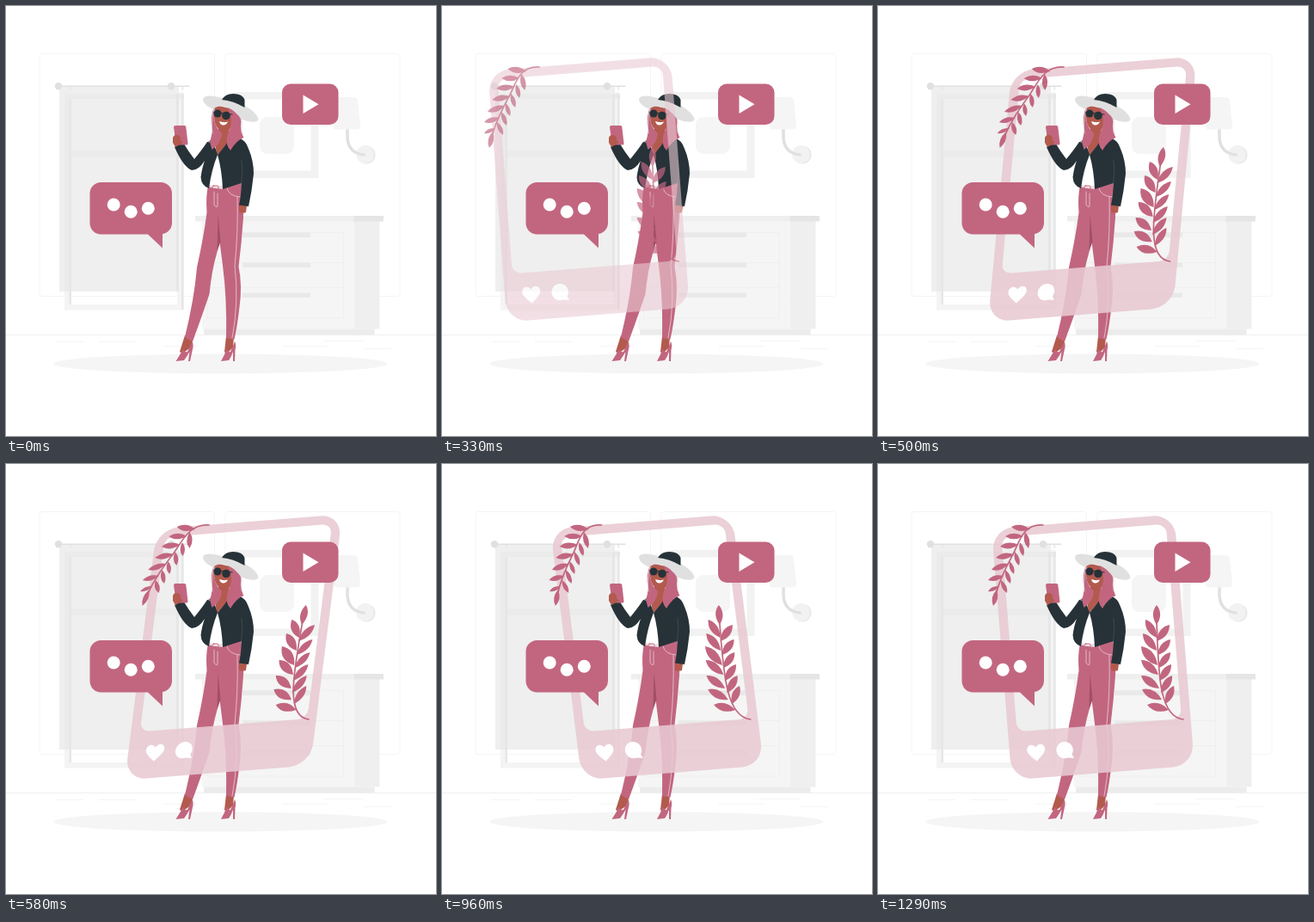
An HTML page that plays this animation: 500 px wide and 500 px high, repeating every 1330 ms.

```html
<!DOCTYPE html>
<html lang="en">
<head>
<meta charset="utf-8">
<title>Social media story</title>
<style>
  html, body { margin: 0; width: 100%; height: 100%; overflow: hidden; background: #fff; }
  svg { display: block; width: 100%; height: 100%; }
  .pink { fill: #c26680; }
  .dark { fill: #263238; }
  .skin { fill: #b35a4e; }
  .white { fill: #fff; }
  .line { fill: none; stroke-linecap: round; }
</style>
</head>
<body>
<svg viewBox="0 0 500 500">
  <g id="room">
    <g class="line" stroke="#f3f3f3" stroke-width=".8">
      <rect x="39" y="55.500" width="203.500" height="282" rx="3"/>
      <rect x="255" y="55.500" width="203" height="282" rx="3"/>
      <path stroke="#ebebeb" d="M0 382.500H500"/>
      <path d="M57 390.500h33M108 390.500h43M185 395.500h38M322 395.500h52M369 389.500h46M417 398.500h31"/>
    </g>

    <!-- window and blind -->
    <path fill="#f4f4f4" fill-rule="evenodd" d="M68 100H206.500V353.500H68ZM75 108V347H199V108Z"/>
    <path fill="#efefef" d="M62 94H201V332H62Z"/>
    <path fill="#ebebeb" d="M68 102H207V108H76V332H68ZM76 168H198V176H76Z"/>
    <path fill="#e6e6e6" d="M73.500 108h2.500v239h-2.500ZM198 102h3v230h-3ZM204 102h2.500v251h-2.500ZM74 94h1.500v4H74ZM204.500 94h1.500v4h-1.500Z"/>
    <path class="line" stroke="#e0e0e0" stroke-width="1.500" d="M59 93.300H213"/>
    <circle cx="61" cy="93.300" r="4.200" fill="#e0e0e0"/>
    <circle cx="192" cy="93.300" r="4.200" fill="#e0e0e0"/>

    <!-- picture -->
    <path fill="#f2f2f2" fill-rule="evenodd" d="M264 100H363.500V200H264ZM273 108.500V191.500H354.500V108.500Z"/>
    <rect x="295" y="129" width="40" height="43" rx="9" fill="#f5f5f5"/>

    <!-- lamp -->
    <circle cx="419" cy="173" r="10.500" fill="#e6e6e6"/>
    <circle cx="417.500" cy="172.500" r="10.500" fill="#f2f2f2"/>
    <path class="line" stroke="#e0e0e0" stroke-width="3.500" d="M397 143V153Q398 171 416 173"/>
    <path fill="#f5f5f5" d="M388 106H404Q408 106 409 110L412 139Q412 143.500 408 143.500H384Q380 143.500 381 139L384 110Q385 106 388 106Z"/>

    <!-- dresser -->
    <path fill="#f5f5f5" d="M228 250H404.500V375.500H228Z"/>
    <path fill="#efefef" d="M404.500 250H434.500V375.500H404.500ZM220 244H405V250.500H220Z"/>
    <path fill="#e5e5e5" d="M404.500 244H439V250.500H404.500Z"/>
    <path fill="#ececec" d="M230 375.500H428.500V382H230Z"/>
    <path class="line" stroke="#efefef" d="M235 263.500H392.500V363H235ZM235 298.500H392.500M235 327.500H392.500"/>
    <path fill="#e9e9e9" d="M275 263.500h79v5.500h-79ZM275 298.500h79v5.500h-79ZM275 333.500h79v5.500h-79Z"/>
    <ellipse cx="249.500" cy="416" rx="194" ry="11.500" fill="#f5f5f5"/>
  </g>

  <g id="woman">
    <path class="skin" d="M208 383L217.500 387 215 397 205 404 202 402ZM256 384H265L264 397 256 405 254 402Z"/>
    <path class="pink" d="M197.500 413Q202 406 206 399 207 403 211 402 214 396 216.500 390 218.500 394 217 399L214 413H212L213.500 402Q210 408 207 412ZM250 413Q254 406 256.500 399 258 403 261 402 264 396 266 390 268 394 266.500 400L266 413H264L264 402Q262 408 259 412Z"/>
    <path class="pink" d="M235.500 207L252 212 273 205Q277 225 276 246 274 275 270.500 303 275 325 271.500 350 269 372 265.500 387.500L256 386Q257 340 252 302L248.500 274 245.500 286Q239 308 236.500 335 226 366 217 390L208 385Q219 340 222 304 230 268 233.500 240 232 220 235.500 207Z"/>
    <path fill="#a24e68" d="M246.500 242L249.500 274 245.500 285Z"/>
    <g class="line" stroke="#e6c2cc" stroke-width=".9">
      <path d="M257 212Q259 221 272 222M269 222Q270 265 266 302 271 345 263 386"/>
      <path d="M242 216V231Q244 235 246 233V218"/>
    </g>
    <path class="white" d="M243 166L249 168 253 213 235 209Z"/>
    <path class="line" stroke="#f1dce2" stroke-width="2.800" stroke-linecap="butt" d="M236 209Q244 212 252 210.500"/>
    <rect x="240" y="209" width="7" height="4" rx="1.500" class="line" stroke="#c26680"/>

    <path class="skin" d="M271 230L280 232 279 240Q275 241 271 240Z"/>
    <path class="skin" d="M247 143H259L260 157 245 174 243 158Z"/>
    <path class="dark" d="M196 164L205.500 158Q212 169 219 178 228 167 234 158L245 153 243 164 246 173Q239 190 236 212 227 209 226.500 199 228 188 231 180 224 191 216 191 206 187 196 164Z"/>
    <path class="dark" d="M246 173Q255 163 261 153L270 153Q279 156 282 166 288 180 288 195 286 215 282 233L271 231.500Q274 217 273.500 206 264 209 252 213 251 190 246 173Z"/>
    <path class="line" stroke="#46535a" stroke-width=".7" d="M274 179Q276 193 273.500 206"/>
    <path class="line" stroke="#fff" stroke-width=".8" d="M230 159Q234 156 237 158"/>

    <path class="pink" d="M197 139H207.500Q209 139 209.300 140.500L211.500 160Q211.500 161.500 210 161.500H200Q198 161.500 197.700 160L195 141Q195 139 197 139Z"/>
    <path class="skin" d="M194 153Q196 149 200 150 204 152 203 156L206 159 197 164 194 159Z"/>

    <path class="skin" d="M243 115L264 120Q266 133 261 142 257 148 251 146 243 142 242 130Z"/>
    <path class="pink" d="M243 115Q236 131 240 144 239 152 237 158L239.500 167Q250 160 251 148 244 143 242 131ZM257 116L271 121Q275 130 273 140 274 149 276.500 153 268 156 261 168 254 161 258 148 264 136 261 127Z"/>
    <path class="line" stroke="#d9d9d9" stroke-width=".8" d="M242 120Q238 136 240 148M272 125Q275 136 274 147"/>
    <path class="white" d="M248 134Q253 136 258 134.500 256 139 252 138.500 249 138 248 134Z"/>
    <circle class="dark" cx="246" cy="125" r="4.600"/>
    <circle class="dark" cx="256" cy="127.500" r="4.800"/>
    <path class="line" stroke="#263238" d="M242 123.500L263 126"/>
    <path fill="#e0e0e0" d="M229 108C232 102 243 105 255 108C272 111 290 121 293.500 131C293 137 281 135 273 131C263 116 247 113 241 120C234 117 229 113 229 108Z"/>
    <path class="dark" d="M251 109Q255 102 264 102 275 102 277.500 109V118Q264 110 251 109Z"/>
  </g>

  <g id="story">
    <path fill="#e9cad3" fill-opacity=".88" fill-rule="evenodd" transform="translate(250 213) rotate(-4.600)"
      d="M-81.500-146.500h163a25 25 0 0 1 25 25v243a25 25 0 0 1-25 25h-163a25 25 0 0 1-25-25v-243a25 25 0 0 1 25-25z
         M-85-136h170a11 11 0 0 1 11 11v205a11 11 0 0 1-11 11h-170a11 11 0 0 1-11-11v-205a11 11 0 0 1 11-11z"/>
    <path class="white" transform="translate(184 335.500) rotate(-5)"
      d="M0 10C-4 6-11 1-10.500-4-10-10-3-11 0-6 3-11 10-10 10.500-4 11 1 4 6 0 10Z"/>
    <path class="white" d="M225.500 337.500L228 342 221 341.500A9.700 9.700 0 1 1 225.500 337.500Z"/>
    <g class="line" stroke="#c26680" stroke-width="1.700">
      <path d="M192 71C168 69 164 92 157 105S142 132 137 152"/>
      <path d="M355 297C326 294 326 240 324 182"/>
    </g>
    <path class="pink" id="leaves"/>
  </g>

  <g id="badges">
    <path class="pink" d="M110.500 205H180A13 13 0 0 1 193 218V252A13 13 0 0 1 182 265V281.500L165 265.500H110.500A13 13 0 0 1 97.500 252.500V218A13 13 0 0 1 110.500 205Z"/>
    <g class="white">
      <circle cx="125.200" cy="231" r="7.500"/>
      <circle cx="145.200" cy="239.200" r="7.500"/>
      <circle cx="165.300" cy="235.200" r="7.500"/>
      <rect class="pink" x="321" y="90.500" width="65.500" height="47.500" rx="10"/>
      <path d="M345.500 103.500V125L363.500 114.200Z"/>
    </g>
  </g>
</svg>
<script>
const story = document.getElementById('story');

// Each leaf: base x, y, tip x, y
const topSprig = [
  [177, 76, 155, 73], [169, 84, 148, 84], [163, 94, 142, 96], [158, 105, 137, 109],
  [152, 116, 132, 123], [146, 130, 128, 135], [141, 142, 128, 148], [138, 146, 134, 165],
  [171, 79, 175, 98], [165, 91, 169, 107], [159, 102, 164, 118], [153, 113, 158, 128],
  [148, 123, 154, 139], [143, 135, 150, 150]
];
const sideSprig = [
  [324, 187, 324, 164], [324, 202, 311, 181], [324, 217, 308, 197], [325, 234, 306, 212],
  [326, 245, 306, 228], [327, 261, 306, 246], [330, 274, 307, 262], [338, 286, 313, 280],
  [324, 206, 339, 187], [325, 222, 340, 204], [326, 237, 340, 219], [327, 252, 341, 233],
  [329, 266, 342, 246], [334, 279, 344, 258]
];

function leaf([x, y, tipX, tipY], girth) {
  const dx = tipX - x, dy = tipY - y;
  const side = s => `${x + dx * .55 - dy * s} ${y + dy * .55 + dx * s}`;
  return `M${x} ${y}Q${side(girth)} ${tipX} ${tipY}Q${side(-girth)} ${x} ${y}Z`;
}
document.getElementById('leaves').setAttribute('d',
  topSprig.map(l => leaf(l, .32)).join('') + sideSprig.map(l => leaf(l, .36)).join(''));

const bezier = (s, a, b) => 3 * (1 - s) ** 2 * s * a + 3 * (1 - s) * s * s * b + s ** 3;

// cubic-bezier(.36, -.01, .5, 1.38)
function ease(x) {
  let lo = 0, hi = 1;
  for (let i = 0; i < 24; i++) {
    const mid = (lo + hi) / 2;
    if (bezier(mid, .36, .5) < x) lo = mid; else hi = mid;
  }
  return bezier(lo, -.01, 1.38);
}

const LOOP = 1330, STEPS = 32, PIVOT_Y = 213;
const tan = deg => Math.tan(deg * Math.PI / 180);
const keys = [
  { at: 0, x: -250, skew: tan(20), alpha: 0 },
  { at: .6, x: 0, skew: tan(-10), alpha: 1 },
  { at: .8, x: 0, skew: tan(2), alpha: 1 },
  { at: 1, x: 0, skew: 0, alpha: 1 }
];

function draw(now) {
  // The motion advances in 24 steps per second
  const step = Math.min(STEPS - 1, Math.floor((now % LOOP + 5) * 24 / 1000));
  const time = (step + 1) / STEPS;
  const i = time <= .6 ? 0 : time <= .8 ? 1 : 2;
  const a = keys[i], b = keys[i + 1];
  const p = ease((time - a.at) / (b.at - a.at));
  const mix = name => a[name] + (b[name] - a[name]) * p;
  const skew = mix('skew');
  story.setAttribute('transform', `matrix(1 0 ${skew} 1 ${mix('x') - skew * PIVOT_Y} 0)`);
  story.setAttribute('opacity', step < 2 ? 0 : Math.min(1, mix('alpha')));
}

const start = performance.now();
function tick() {
  draw(performance.now() - start);
  requestAnimationFrame(tick);
}
tick();
</script>
</body>
</html>
```
